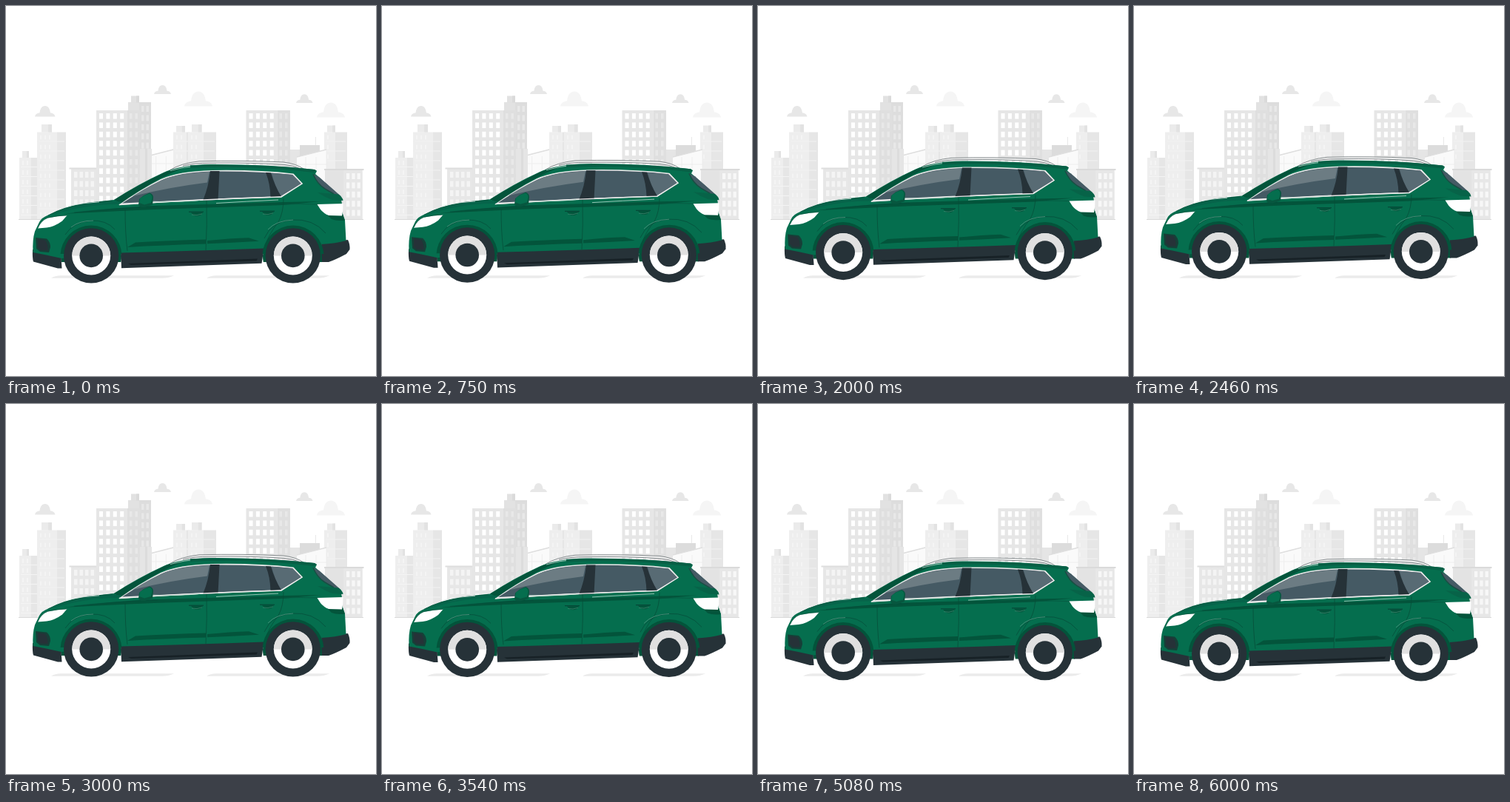
An HTML page with a canvas for the animation above (6040 ms loop, 500 px wide and 500 px high).

```html
<!DOCTYPE html>
<html lang="en">
<head>
<meta charset="utf-8">
<title>Car in the city</title>
<style>
html, body { margin: 0; width: 100%; height: 100%; overflow: hidden; background: #fff; }
canvas { display: block; width: 500px; height: 500px; }
</style>
</head>
<body>
<canvas id="stage"></canvas>
<script>
const LOOP = 6040, LIFT = 6;
const GREEN = '#056e4e', DEEP = '#03543b', DARK = '#263238', GLASS = '#455a64', RIM = '#e8e8e8';
const canvas = document.getElementById('stage');
const ctx = canvas.getContext('2d');
const ratio = window.devicePixelRatio || 1;
canvas.width = canvas.height = 500 * ratio;

function fill(d, color) {
  ctx.fillStyle = color;
  ctx.fill(new Path2D(d));
}
function line(d, color, width = 1) {
  ctx.strokeStyle = color;
  ctx.lineWidth = width;
  ctx.stroke(new Path2D(d));
}
function box(x, y, w, h, color) {
  ctx.fillStyle = color;
  ctx.fillRect(x, y, w, h);
}
function disc(x, y, r, color, from = 0, to = Math.PI * 2) {
  ctx.fillStyle = color;
  ctx.beginPath();
  ctx.arc(x, y, r, from, to);
  ctx.fill();
}
function grid(x, y, cols, rows, dx, dy, w, h, color) {
  for (let r = 0; r < rows; r++)
    for (let c = 0; c < cols; c++) box(x + c * dx, y + r * dy, w, h, color);
}

function cloud(x, y, w, color) {
  const s = w / 38;
  ctx.save();
  ctx.translate(x, y);
  ctx.scale(s, s);
  fill('M0 0C1-5 5-7 9-7C10-15 13-20 19-20C25-20 28-15 29-7C33-7 37-5 38 0Z', color);
  ctx.restore();
}

function tower(x) {
  box(x, 141, 42, 130, '#e6e6e6');
  box(x + 42, 141, 17.5, 130, '#dfdfdf');
  grid(x + 4, 145, 4, 10, 9.4, 12.4, 5, 7.6, '#fff');
  grid(x + 45, 145, 2, 10, 7.5, 12.4, 3.5, 7.6, '#e8e8e8');
}

function block(x, y, w, split, capX, capW, capH, bottom) {
  box(x, y, split, bottom - y, '#eeeeee');
  box(x + split, y, w - split, bottom - y, '#e6e6e6');
  box(capX, y - capH, capW, capH, '#ebebeb');
  box(capX + capW * .65, y - capH, capW * .35, capH, '#e2e2e2');
  for (let k = y + 12; k < bottom - 2; k += 13) box(x + 2, k, w - 4, 1, '#f4f4f4');
  grid(x + 4, y + 4, Math.floor((split - 4) / 6), Math.floor((bottom - y) / 13), 6, 13, 2, 6, '#f4f4f4');
}

function shed(x, y, w, h, rise) {
  fill(`M${x} ${y}L${x + w} ${y - rise}V${y + h}H${x}Z`, '#fafafa');
  line(`M${x} ${y}L${x + w} ${y - rise}`, '#dedede', 1.6);
  line(`M${x + w} ${y - rise}V${y + h}M${x + w * .3} ${y}V${y + h}M${x + w * .65} ${y}V${y + h}M${x} ${y + 10}H${x + w}`, '#e8e8e8', .7);
}

function city() {
  cloud(39, 149.5, 27.5, '#e7e7e7');
  cloud(200, 119, 23, '#e7e7e7');
  cloud(241, 135.5, 38, '#f5f5f5');
  cloud(392, 131, 22.5, '#e7e7e7');
  cloud(420, 150.5, 38, '#f5f5f5');

  block(18, 205, 26, 16, 22, 9, 9, 288);
  block(42, 170.5, 39, 27, 48, 14, 10.5, 288);

  box(88, 220, 34, 60, '#e7e7e7');
  box(85.5, 218.5, 37, 2, '#dedede');
  grid(92, 224, 4, 4, 7.5, 12.5, 4.5, 8, '#f4f4f4');

  box(165, 130, 31, 100, '#e2e2e2');
  box(180, 130, 16, 100, '#dddddd');
  box(169, 121.5, 11, 9, '#e2e2e2');
  box(176, 121.5, 4, 9, '#dadada');
  grid(183, 135, 2, 5, 6.5, 12.4, 3.5, 8, '#e8e8e8');
  tower(122);
  shed(191, 203, 39, 42, 10);
  box(181, 193, 16, 50, '#e5e5e5');
  box(188, 193, 3, 50, '#dcdcdc');

  block(226, 170.5, 22, 18, 230, 12, 8.5, 220);
  block(246, 170.5, 38, 21, 251, 13.5, 10.5, 220);
  tower(324.5);
  box(384, 194, 13, 26, '#e5e5e5');
  box(397, 188, 27, 20, '#dcdcdc');
  box(418, 177, .7, 12, '#dedede');
  block(430, 170.5, 31, 15, 434, 11, 9, 222);
  shed(393, 204, 40, 45, 10);
  box(431, 221, 50.5, 67, '#e3e3e3');
  box(430, 220, 53.5, 2, '#dadada');
  box(456, 222, 25.5, 66, '#e7e7e7');
  grid(460, 226, 3, 5, 7.3, 12.4, 4.3, 8, '#f7f7f7');
  box(17, 288, 30, .8, '#d0d0d0');
  box(455, 288, 28, .8, '#d0d0d0');

  fill('M61 367.8Q66 364.3 74 364.3H227Q220 367.8 210 367.8Z', '#ebebeb');
  fill('M271 367.8Q276 364.3 284 364.3H437Q430 367.8 420 367.8Z', '#ebebeb');
}

function wheel(x) {
  const y = 337.4;
  disc(x, y, 37.2, DARK);
  disc(x, y, 26, '#fff');
  disc(x, y, 26, '#e0e0e0', Math.PI, Math.PI * 2);
  disc(x, y, 15.8, DARK);
}

function handle(x, y) {
  fill(`M${x} ${y}H${x + 16}Q${x + 14} ${y + 5} ${x + 8} ${y + 5}Q${x + 3} ${y + 5} ${x} ${y}Z`, DEEP);
  line(`M${x - 3} ${y - .6}H${x + 17}`, '#064837', 1.2);
  line(`M${x + 1} ${y + 3.2}Q${x + 8} ${y + 5} ${x + 15} ${y + 2}`, '#4e947d', .6);
}

function rails() {
  fill('M221 222Q235 212.5 261 210Q320 208.5 375 211.3Q392 213 402 220L396 219Q386 215 372 214Q310 211 262 213Z', '#f1f1f1');
  line('M221 222Q236 212.5 261 209.8Q320 208.3 375 211Q392 213 402 220', '#6d7477', .8);
  line('M239 216Q255 212 275 212.2Q335 211.5 376 214.4Q388 215.4 397 219.5', '#555e62', .7);
}

function glass() {
  fill('M152 269Q182 247.5 209 234Q233 223 279 222Q340 221 388 226.5L401 240L372 258.5Q265 262 152 269Z', RIM);
  fill('M157 266.5Q186 247.5 210 235.5Q234 224.5 278 223.5Q340 222.8 387 228L399 240L371 257Q265 260.5 157 266.5Z', GLASS);
  fill('M171 257Q199 239.5 219 232Q244 225 275 224L272 238.5Q220 245 171 257Z', '#6c7c83');
  fill('M359 225.8L387 228L399 240L371 257Q363 243 359 225.8Z', '#586b74');
  fill('M276 223L288.5 223L286.5 262L266 263Q274 244 276 223Z', DARK);
  fill('M351 225L358 225.5Q363 243 372 257.5L357.5 258.2Q357 240 351 225Z', DARK);
  line('M153 268.5Q265 261 372 258L400 240L388 227', RIM, 1.3);
}

function car() {
  rails();
  // Wheel wells
  ctx.save();
  ctx.beginPath();
  ctx.rect(30, 280, 440, 66);
  ctx.clip();
  disc(115, 338, 41, DEEP);
  disc(388, 338, 41, DEEP);
  ctx.restore();

  // Bumpers and sill
  fill('M36 329L74 333L75.5 354.5H70L37 345.5Q35.5 341 36 329Z', DARK);
  fill('M155 330L349 325L345.5 347.8L156 354.3Z', DARK);
  fill('M165 348L340 341.5L338.5 344.5L169 350Z', '#172126');
  fill('M426 320L462 316Q465 322 464.5 329L460 335Q445 343 436 346H427Z', DARK);

  // Body
  fill('M36.5 333Q35.5 316 39 304.5L45 292Q48 286 57 282.5Q78 271 110 265.8L146 262Q178 241 213 225Q235 214.8 276 214Q352 213.5 417 221L420 223L418 227L449 254.5Q454.5 259 455 281L458 289L459.5 317Q446 321 426 322L349 327.5Q250 331 155 333.5L75 341L52 336Z', GREEN);
  fill('M146 262Q180 241 214 225Q225 220 239 219Q208 231.5 179 250.5Q166 258 157 267Z', DEEP);
  fill('M109 266.3Q145 262.5 157 265L154 268Q110 267 62 282.5Q82 272 109 266.3Z', '#06644a');
  line('M57 283Q78 272 110 266.6Q129 264.6 144 263', '#064b39', .7);
  line('M84 270.3Q105 265.8 126 264.8', '#d8e8e2', .8);
  line('M222 222.6Q240 217.4 258 216', '#d7e6e0', .7);
  fill('M249 215.3Q330 212.5 417 221L420 223L416 225Q330 215 249 219Z', '#075f45');

  glass();

  // Body creases
  fill('M77 281Q140 273 200 270L375 265L426 264L374 269L200 275Q130 278 77 281Z', DEEP);
  line('M92 279Q150 272.5 205 271', '#064b39', .6);
  line('M189 264Q235 265.5 262 262.5M284 266.5Q325 264 368 262', '#b9d8cc', .8);
  fill('M164 326L175 319.5Q220 317 270 315.5V321.5Q212 323 164 326Z', DEEP);
  fill('M272 321.3V317Q303 314 328 313.2L342 317.8Q305 320 272 321.3Z', DEEP);
  line('M161 275Q161 307 164 331M271 263Q272 295 270 330M375 260Q375 279 368 292Q355 308 349 327', '#074c39', .75);
  handle(250, 278.8);
  handle(346, 277.8);

  // Mirror
  fill('M179 269L180 261L186 256L194 252.5Q199 254 199 259L198 268.5L188 272H182Z', '#07573f');
  fill('M180 266L181 260L187 256L194 253.5Q197.5 255 197.5 259L196 266L187 268.5Z', GREEN);

  // Front details
  fill('M43 300.5Q47 290 56 286.5Q70 283.5 82.5 283L76 290.5Q66 298 55 299.5Z', '#fff');
  line('M43 300Q48 289 57 286Q70 283 82 283', '#064c38', .6);
  fill('M40 313L55 314.5Q60 319 60 326L58 333L46 332L41 328Z', '#173f38');
  fill('M43 315L53 316.5Q57 321 56.5 330L47 330L43 326Z', DARK);

  // Rear details
  fill('M415 227L423 231L452 256.5L442 254L430 247Q419 239 415 227Z', GLASS);
  line('M415 227Q420 240 431 247L443 254', '#174f43', 1.5);
  line('M376 268Q398 267 421 268', '#075740', .8);
  fill('M430 278L455 281L457 288L458 289.5Q447 291 440 288Z', DEEP);
  fill('M420.5 268L455.5 267Q456 276 454 283.5L436 283Q429 280 425 275Z', '#fff');
  fill('M449 254.5Q455 258 455.5 263L441 262Q430 258 421 252Z', '#076348');

  // Wheel arches over the body
  ctx.save();
  ctx.beginPath();
  ctx.rect(30, 280, 440, 55);
  ctx.clip();
  disc(115, 338, 41.5, DEEP);
  disc(388, 338, 41.5, DEEP);
  ctx.restore();
  line('M80 309Q91 292 114 290Q136 289 147 302', '#064f3b', .8);
  line('M88 299Q99 290 118 290', '#5d9e88', .7);
  line('M349 314Q359 291 386 289Q415 287 432 307', '#064f3b', .8);
  line('M354 302Q365 290 388 289', '#5d9e88', .7);

  wheel(115.2);
  wheel(387.8);
}

function draw(now) {
  const phase = (now % LOOP) / LOOP;
  const lift = LIFT * (1 - Math.cos(phase * Math.PI * 2)) / 2;
  ctx.setTransform(ratio, 0, 0, ratio, 0, 0);
  box(0, 0, 500, 500, '#fff');
  city();
  ctx.translate(0, -lift);
  car();
}

let start;
function tick(now) {
  if (start === undefined) start = now;
  draw(now - start);
  requestAnimationFrame(tick);
}
draw(0);
requestAnimationFrame(tick);
</script>
</body>
</html>
```
